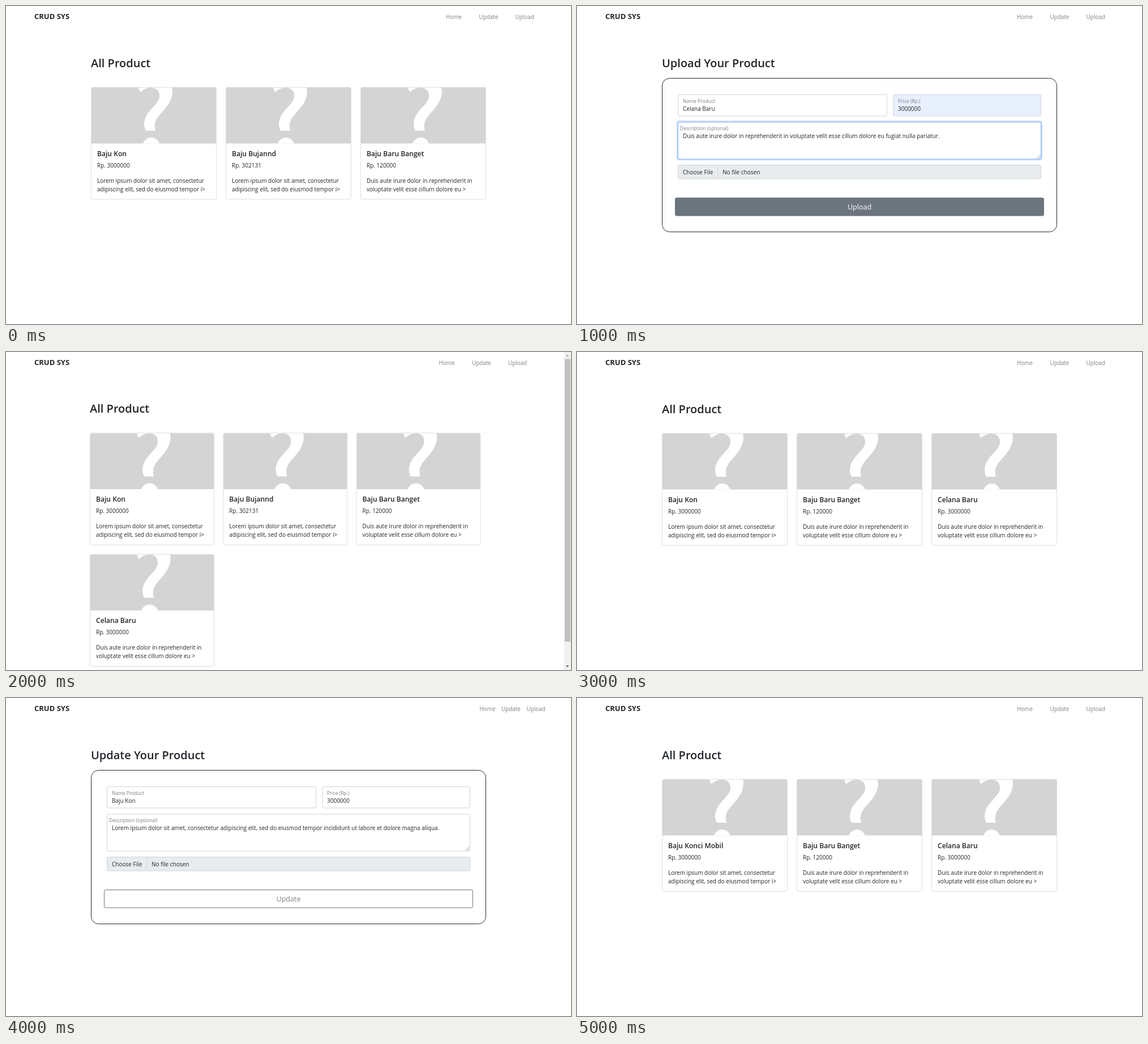
Animation, 998 px wide and 561 px high, one loop 6000 ms. Source, as an HTML page:

```html
<!DOCTYPE html>
<html lang="en">
<head>
<meta charset="utf-8">
<title>Product manager</title>
<style>
  html, body { margin: 0; width: 100%; height: 100%; overflow: hidden; background: #fff; }
  svg { display: block; }
  text { font: 10px "Open Sans", "Noto Sans", sans-serif; fill: #212529; white-space: pre; }
  .brand { font-size: 13px; font-weight: 700; }
  .nav { font-size: 9.9px; fill: #808080; }
  .heading { font-size: 20px; font-weight: 600; }
  .title { font-size: 12.1px; font-weight: 600; }
  .label { font-size: 8.5px; fill: #7a7d80; }
  .button { font-size: 12.5px; text-anchor: middle; }
</style>
</head>
<body>
<svg id="stage" width="998" height="561" viewBox="0 0 998 561"></svg>
<script>
const stage = document.getElementById('stage');

const LOREM = 'Lorem ipsum dolor sit amet, consectetur adipiscing elit, sed do eiusmod tempor incididunt ut labore et dolore magna aliqua.';
const DUIS = 'Duis aute irure dolor in reprehenderit in voluptate velit esse cillum dolore eu fugiat nulla pariatur.';
const LOREM_LINES = ['Lorem ipsum dolor sit amet, consectetur', 'adipiscing elit, sed do eiusmod tempor i&gt;'];
const DUIS_LINES = ['Duis aute irure dolor in reprehenderit in', 'voluptate velit esse cillum dolore eu &gt;'];

const product = (name, price, lines) => ({ name, price, lines });
const kon = product('Baju Kon', 3000000, LOREM_LINES);
const mobil = product('Baju Konci Mobil', 3000000, LOREM_LINES);
const bujannd = product('Baju Bujannd', 302131, LOREM_LINES);
const banget = product('Baju Baru Banget', 120000, DUIS_LINES);
const celana = product('Celana Baru', 3000000, DUIS_LINES);

const text = (x, y, content, cls = '') => `<text x="${x}" y="${y}" class="${cls}">${content}</text>`;

// Box given by its outer edges.
const box = (left, top, right, bottom, fill, stroke = 'none', radius = 2.5) =>
  `<rect x="${left}" y="${top}" width="${right - left}" height="${bottom - top}" rx="${radius}" fill="${fill}" stroke="${stroke}"/>`;

const header = navX => text(50, 23, 'CRUD SYS', 'brand') +
  ['Home', 'Update', 'Upload'].map((item, i) => text(navX[i], 22.8, item, 'nav')).join('');

const WIDE_NAV = [777, 835.5, 899.5];
const TIGHT_NAV = [836.5, 875, 919.5];

function card({ name, price, lines }, x, y, width) {
  return `<g transform="translate(${x} ${y})">
    ${box(0.5, 0.5, width - 0.5, 198, '#fff', '#dfdfdf')}
    <path d="M1 99.5V3Q1 1 3 1H${width - 3}Q${width - 1} 1 ${width - 1} 3V99.5Z" fill="#d4d4d4"/>
    <path transform="scale(${width / 222} 1)" fill="#fff" d="M83.5 1L87.5 9Q95 2 103 1C115 0 122 6 121 17C120 32 94 42 94 66
      Q94 72 97 77H114Q112 70 113 66C115 47 141 38 144 10Q144 4 143 1ZM92 99.5A15.3 15.3 0 0 1 121 99.5Z"/>
    ${text(11, 122, name, 'title')}
    ${text(11, 142, 'Rp. ' + price)}
    ${text(11, 168.5, lines[0])}
    ${text(11, 184, lines[1])}
  </g>`;
}

const scrollbar = () => box(985.5, 0, 998, 561, '#f1f1f1', 'none', 0) +
  box(987, 12.5, 997, 511, '#c1c1c1', 'none', 0) +
  '<path d="M989 8L991.7 5L994.4 8Z" fill="#a3a3a3"/><path d="M989 553L991.7 556L994.4 553Z" fill="#505050"/>';

function listPage(products, scrolling = false) {
  const [left, top, width, pitch] = scrolling ? [148, 142.4, 220, 235.3] : [150, 143, 222, 238];
  const cards = products.map((item, i) =>
    card(item, left + (i % 3) * pitch, top + Math.floor(i / 3) * 214, width));
  return header(scrolling ? WIDE_NAV.map(x => x - 12.4) : WIDE_NAV) +
    text(left, scrolling ? 107.3 : 108, 'All Product', 'heading') +
    cards.join('') + (scrolling ? scrollbar() : '');
}

function formPage({ action, navX, name, description, active }) {
  const border = '#ced4da';
  return header(navX) +
    text(150, 108, `${action} Your Product`, 'heading') +
    box(150.5, 127.5, 847.5, 398.5, '#fff', '#212529', 13) +
    box(178.5, 156.5, 547.5, 194, '#fff', border) +
    text(187, 171, 'Name Product', 'label') + text(187, 185, name) +
    box(559, 156.5, 819.5, 194, active ? '#e8f0fe' : '#fff', border) +
    text(567, 171, 'Price (Rp.)', 'label') + text(567, 185, 3000000) +
    (active ? box(176, 202.3, 822, 272.3, '#c2dbfe', 'none', 4.5) : '') +
    box(178.5, 205, 819.5, 270, '#fff', active ? '#86b7fe' : border) +
    '<path d="M812.5 269L818.5 263M816 269L818.5 266.5" stroke="#777" stroke-width=".8"/>' +
    text(182, 219, 'Description (optional)', 'label') + text(187, 233, description) +
    box(178.5, 280.5, 819.5, 305, '#e9ecef', border) +
    `<path d="M248.5 281V305" stroke="${border}"/>` +
    text(187, 297.3, 'Choose File') + text(257, 297.3, 'No file chosen') +
    box(173.5, 338.5, 824.5, 370, active ? '#6c757d' : '#fff', '#6c757d') +
    `<text x="499" y="358.5" class="button" style="fill:${active ? '#fff' : '#7b7f84'}">${action}</text>`;
}

const pages = [
  listPage([kon, bujannd, banget]),
  formPage({ action: 'Upload', navX: WIDE_NAV, name: 'Celana Baru', description: DUIS, active: true }),
  listPage([kon, bujannd, banget, celana], true),
  listPage([kon, banget, celana]),
  formPage({ action: 'Update', navX: TIGHT_NAV, name: 'Baju Kon', description: LOREM, active: false }),
  listPage([mobil, banget, celana]),
];

const PAGE_MS = 1000;
let shown = -1;

function render() {
  const index = Math.floor(performance.now() / PAGE_MS) % pages.length;
  if (index !== shown) {
    stage.innerHTML = pages[index];
    shown = index;
  }
  requestAnimationFrame(render);
}
render();
</script>
</body>
</html>
```
